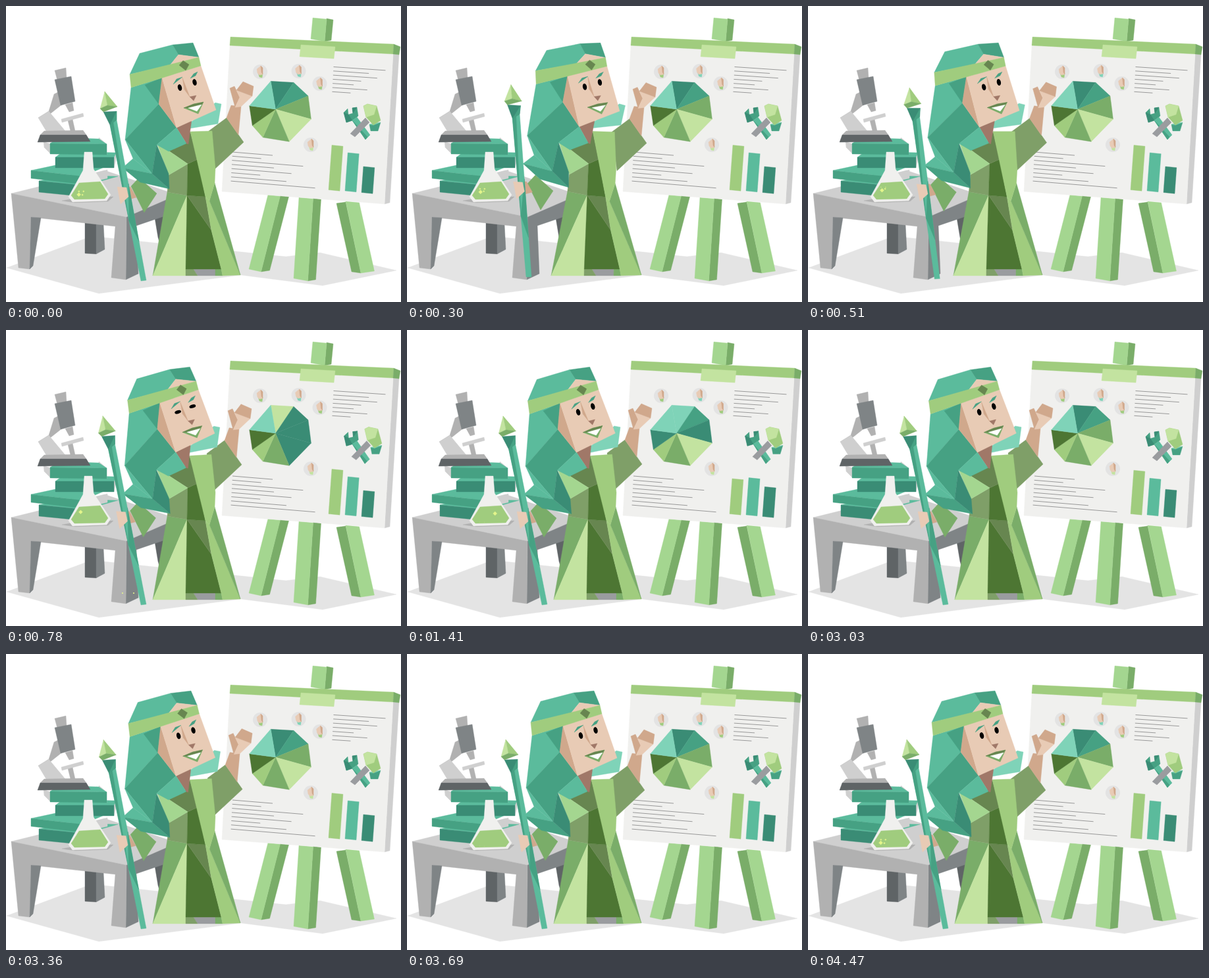
An HTML page for the animation above (4500 ms loop, 600 by 450 pixels).

```html
<!DOCTYPE html>
<html lang="en">
<head>
<meta charset="utf-8">
<title>Presentation</title>
<style>
html, body { margin: 0; width: 100%; height: 100%; overflow: hidden; background: #fff; }
svg { display: block; width: 100vw; height: 100vh; }
</style>
</head>
<body>
<svg id="stage" viewBox="0 0 600 450"></svg>
<script>
const LOOP = 4500;
const stage = document.getElementById('stage');
const C = {
  deep: '#3a8c75', teal: '#46a183', sea: '#5bbb9c', mint: '#7fd3b8',
  forest: '#4d7633', olive: '#678650', moss: '#7f9f68', leaf: '#7aad69',
  green: '#a0cc7e', fresh: '#a4d690', lime: '#c3e3a0',
  skin: '#e8cbb5', tan: '#d0a88c', brown: '#a07868',
  pale: '#e4e4e4', light: '#cfcfcf', gray: '#b1b1b1', steel: '#7f8486', dark: '#5f6466',
  mid: '#9a9c9f', paper: '#f0f0ee', white: '#fff', spark: '#e3f58b'
};

function el(parent, tag, attrs) {
  const e = document.createElementNS('http://www.w3.org/2000/svg', tag);
  for (const k in attrs) e.setAttribute(k, attrs[k]);
  parent.appendChild(e);
  return e;
}
const group = (parent = stage) => el(parent, 'g', {});
const place = (node, value) => node.setAttribute('transform', value);
const show = (node, on) => node.setAttribute('visibility', on ? 'visible' : 'hidden');
const paint = (node, color) => {
  node.setAttribute('fill', C[color]);
  node.setAttribute('stroke', C[color]);
};
function poly(parent, color, points) {
  const p = el(parent, 'polygon', { points, 'stroke-width': 0.4 });
  paint(p, color);
  return p;
}

// Faces over shared corners: 'a10,20 b...' and 'color:abc ...'; returns a redraw function
function mesh(parent, corners, faces) {
  const at = {};
  for (const c of corners.split(' ')) at[c[0]] = c.slice(1).split(',').map(Number);
  const list = faces.split(' ').map(f => {
    const [color, keys] = f.split(':');
    return { node: poly(parent, color, ''), keys: [...keys] };
  });
  const update = (move = p => p) => list.forEach(f =>
    f.node.setAttribute('points', f.keys.map(k => move(at[k]).join()).join(' ')));
  update();
  return update;
}

// Slanted post with a side face; negative side puts it on the left
function post(x, y, bx, by, w, side) {
  const drop = side < 0 ? -3 : 4, edge = side < 0 ? 0 : w, low = by + (side < 0 ? 0 : drop);
  poly(easel, 'leaf', `${x + edge},${y + 1} ${x + edge + side},${y + 3} ${bx + edge + side},${low - 2} ${bx + edge},${low}`);
  poly(easel, 'fresh', `${x},${y} ${x + w},${y + 2} ${bx + w},${by + drop} ${bx},${by}`);
}

// Book: front face, then the top reaching back by two offsets
function book(x, y, w, drop, h, color, back, far) {
  const rx = x + w, ry = y + drop;
  poly(room, 'light', `${rx},${ry} ${rx + far},${ry - 10} ${rx + far},${ry + 3} ${rx},${ry + h}`);
  poly(room, 'sea', `${x},${y} ${x + back},${y - 9} ${rx + far},${y - 7} ${rx},${ry}`);
  poly(room, color, `${x},${y} ${rx},${ry} ${rx},${ry + h} ${x},${y + h}`);
}

const room = group();
poly(room, 'pale', '1,398 130,350 425,381 477,375 593,402 481,425 357,409 141,437');
mesh(room, 'a8,285 b150,250 c245,282 d245,294 e183,321 f182,416 g160,413 h166,335 i38,321 j36,400 k19,398 l245,318 m198,334 n201,407 o53,322 p41,395 q120,329 r137,331 s137,377 t120,376 u148,332 v150,370 w226,322 x239,316 y237,372 z231,352',
  'dark:qrst steel:ruvs dark:wxyz light:abcde steel:edlmnf gray:aefghijk steel:iopj');

book(50, 266, 70, 7, 17, 'deep', 40, 50);
book(38, 250, 78, 9, 12, 'teal', 42, 38);
book(75, 230, 89, 0, 16, 'deep', 12, 3);
poly(room, 'light', '57,206 68,210 68,225 58,215');
book(67, 209, 86, 1, 16, 'teal', 13, -12);

// Microscope
mesh(room, 'a73,134 b81,130 c86,149 d67,164 e49,170 f65,160 g90,190 h61,190 i94,174 j101,172 k105,190 l98,190 m58,190 n117,189 o122,196 p52,196 q128,206 r48,207',
  'gray:abcdef light:efgh gray:ijkl gray:mnop dark:poqr');
mesh(room, 'a90,150 b101,147 c103,159 d96,161 e74,98 f91,94 g92,110 h78,113 i74,112 j99,107 k105,145 l83,151 m84,172 n117,163 o118,168 p85,177',
  'gray:abcd gray:efgh steel:ijkl light:mnop');

// Flask
poly(room, 'gray', '85,296 120,290 163,290 155,297 105,299');
poly(room, 'paper', '119,222 131,222 133,248 159,287 153,296 101,298 95,290 117,250');
poly(room, 'green', '111,269 143,267 155,286 150,293 104,294 99,288');

// Rising bubbles
const sparks = [];
function bubble(x, dx, at, life, r = 1.3, y = 292.5) {
  const node = poly(room, 'spark', `0,${-r} ${r},0 0,${r} ${-r},0`);
  sparks.push({ node, x, dx, at, life, y });
}
for (const at of [1380, 3660])
  for (const x of [110.5, 117.5]) bubble(x, 0.5, at, 1420);
bubble(109, 5, 4050, 1400, 3);
bubble(115.5, 2, 4200, 1000);
bubble(133, 2, 1140, 800, 3, 285);
const drops = group();
for (const cx of [177, 194]) el(drops, 'circle', { cx, cy: 400, r: 1.1, fill: C.spark });

// Easel and board
const easel = group();
post(466, 18, 463, 50, 21, 10);
post(398, 287, 369, 400, 18.5, 13);
post(445, 291, 437, 414, 21.5, 12);
post(516, 297, 539, 406, 20.5, -14);
mesh(easel, 'a341,47 b589,58 c599,62 d597,74 e588,73 f340,60 g583,299 h575,301 i328,282 j448,59 k500,62 l498,80 m446,77',
  'light:edgh paper:fehi green:abef leaf:bcde lime:jklm');

function badge(x, y, tip) {
  const g = el(easel, 'g', { transform: `translate(${x} ${y})` });
  el(g, 'circle', { r: 11, fill: '#e3e3e3' });
  poly(g, tip, '-3,2 4,2 3,9 -1,8');
  poly(g, 'skin', '-5,-4 1,-9 4,-6 4,4 -1,5 -4,2');
  poly(g, 'tan', '1,-9 4,-6 4,4 2,1');
}
badge(386, 100, 'green');
badge(444.5, 99, 'mint');
badge(476.5, 118, 'green');
badge(463, 211, 'lime');

function lines(x, y, slope, widths) {
  widths.forEach((w, i) => {
    const x1 = x - i * 0.35, y1 = y + i * 6.3;
    el(easel, 'line', { x1, y1, x2: x1 + w, y2: y1 + w * slope, stroke: '#999', 'stroke-width': 1 });
  });
}
lines(497.5, 92.5, 0.068, [79, 54, 67, 43, 32, 53, 28]);
lines(344, 222, 0.083, [61, 44, 108, 64, 91, 44, 84, 128]);

// Pie: rim angles on a circle, slices meet off centre
const rim = [-108, -65.5, -29, 14.5, 74, 124, 153, 190].map(d => {
  const a = d * Math.PI / 180;
  return `${417 + 48 * Math.cos(a)},${160 + 48 * Math.sin(a)}`;
});
const pie = ['deep', 'teal', 'leaf', 'lime', 'leaf', 'green', 'forest', 'mint'].map((color, i) =>
  ({ color, node: poly(easel, color, `409.5,157 ${rim[i]} ${rim[(i + 1) % 8]}`) }));
const flashes = [
  { slice: 0, from: 540, to: 990, color: 'lime' },
  { slice: 0, from: 990, to: 1890, color: 'mint' },
  { slice: 1, from: 600, to: 1170, color: 'deep' },
  { slice: 2, from: 660, to: 1740, color: 'deep' },
  { slice: 3, from: 720, to: 1290, color: 'deep' },
  { slice: 6, from: 1380, to: 1950, color: 'deep' }
];

// Bars: each swings twice and all settle together
const bars = [
  { x: 490, y: 279.5, top: 211.5, color: 'green', at: 1080, amp: 20 },
  { x: 515, y: 281, top: 223, color: 'sea', at: 1330, amp: 20 },
  { x: 540, y: 283.5, top: 244, color: 'deep', at: 1230, amp: -18 }
];
for (const b of bars) b.node = poly(easel, b.color, '');

const wrench = group(easel);
mesh(wrench, 'a513,162 b519,156 c520,165 d527,163 e526,155 f533,154 g535,167 h528,177 i517,177 j526,174 k533,169 l553,196 m546,203 n537,173 o549,199',
  'teal:abcdefgkji deep:acji deep:efd sea:jklm teal:jom');
const hammer = group(easel);
mesh(hammer, 'a523,194 b546,170 c552,177 d530,199 e552,180 f569,177 g565,190 h554,190 i543,152 j549,149 k563,152 l569,174 m558,181 n547,169 o559,165',
  'mid:abcd teal:efgh mint:efm green:ijklmn lime:ijkon');

// Figure
const arm = group();
mesh(arm, 'a308,190 b335,170 c361,207 d316,249 e342,151 f357,153 g353,196 h340,125 i347,122 j355,139 k348,154 l350,128 m360,115 n376,122 o374,137',
  'moss:abcd tan:befg tan:hijk skin:lofkj tan:lmno');

const dress = mesh(group(),
  'a245,283 b275,288 c223,410 d273,410 e273,400 f327,400 g329,410 h356,409 i303,290 j312,341 k309,296 l317,269 m247,257 n276,240 o291,233 p229,208 q247,220 r274,206 s280,191 t313,190 u318,247 v284,399 w318,400 x318,410 y291,410',
  'leaf:abc lime:bdc mid:vwxy moss:evyd leaf:wfgx forest:befj olive:bij green:ikhgfj leaf:lkh moss:mnba forest:noib olive:qrson fresh:pqnm green:stulki');

const sleeve = group();
poly(sleeve, 'leaf', '190,274 202,261 229,285 210,314');

const head = group();
mesh(head, 'a188,104 b203,72 c253,59 d284,56 e293,78 f262,74 g190,124 h296,91 i237,109 j232,149 k259,185 l319,158 m181,203 n222,255 o229,211 p274,209 q247,221 r193,232 s177,246 t204,268 u248,278 v247,255 w211,120 x249,90 A279,178 B318,147 C327,149 D322,179 E280,186 F282,173 G277,210',
  'mint:ABCDE brown:kFGp sea:gijm teal:wij teal:mjkon sea:mrn sea:srn teal:snut deep:onuv sea:okpq tan:ijk skin:ihlk sea:abcfx teal:cdef skin:fex green:aehg');
mesh(head, 'a263,90 b269,83 c278,89 d273,98 e254,119 f259,111 g268,108 h280,110 i285,103 j291,100 k288,106 l268,109 m271,127 n279,138 o289,136 p285,144 q270,155 r285,149 s300,146 t292,164 u277,155 v297,150 w290,160',
  'olive:abcd teal:efg teal:hijk tan:lmn brown:nop leaf:qrst olive:qrsvu white:uvw');
const eyes = [[264, 124], [286.5, 116]].map(([cx, cy]) =>
  el(head, 'ellipse', { cx, cy, transform: `rotate(-14 ${cx} ${cy})` }));

const palm = group(), staff = group(), fingers = group();
poly(palm, 'tan', '183,275 189,275 198,291 183,295');
mesh(staff, 'a150,130 b143,156 c154,151 d169,153 e148,161 f168,160 h158,181 k168,173 l213,417 m205,418 n187,327 o163,177 p186,270 q202,358',
  'sea:hklm teal:hon teal:npq deep:efkh teal:fkh lime:abc green:acd leaf:bcde');
poly(fingers, 'skin', '169,275 183,276 186,290 174,301');

const clamp = u => Math.min(1, Math.max(0, u));
const ease = u => (u = clamp(u), u * u * (3 - 2 * u));
const span = (t, a, b) => ease((t - a) / (b - a));

// Lean right, then left, hold, return
const lean = t => 3.2 * span(t, 0, 300) - 5.3 * span(t, 300, 900) + 2.1 * span(t, 3060, 3640);

function render(t) {
  const deg = lean(t), a = deg * Math.PI / 180;
  const right = Math.max(0, deg) / 3.2, left = Math.max(0, -deg) / 2.1;

  // The skirt follows only the right lean
  dress(([x, y]) => {
    const k = y < 232 ? 1 : x > 340 || deg < 0 ? 0 : 0.4;
    return [x + a * k * (231 - y), y + (y < 300 ? a * k * (x - 288) : 0)];
  });
  place(head, `rotate(${deg} 288 231)`);
  place(arm, `translate(${3 * right - 4 * left} ${1.5 * right - 3 * left})`);
  place(sleeve, `translate(${-7 * right - 2 * left} ${-4 * right + left})`);
  for (const g of [palm, fingers])
    place(g, `translate(${-7.5 * right - 2 * left} ${-8 * right + left})`);
  place(staff, `translate(0 ${-7 * right}) rotate(${6.3 * right} 185 200) rotate(${-0.8 * left} 209 417)`);

  const shut = span(t, 660, 750) - span(t, 810, 900);
  for (const e of eyes) {
    e.setAttribute('rx', 3.1 + 1.9 * shut);
    e.setAttribute('ry', 5 - 2.4 * shut);
  }

  for (const s of pie) paint(s.node, s.color);
  for (const f of flashes)
    if (t >= f.from && t < f.to) paint(pie[f.slice].node, f.color);

  for (const b of bars) {
    const u = clamp((t - b.at) / (3130 - b.at));
    const top = b.top + b.amp * Math.sin(2 * Math.PI * u) ** 2;
    const x = b.x + (b.y - top) * 0.073;
    b.node.setAttribute('points', `${x},${top} ${x + 17},${top + 1.7} ${b.x + 17},${b.y + 1.7} ${b.x},${b.y}`);
  }

  const work = Math.sin(clamp((t - 570) / 1050) * Math.PI * 3);
  place(wrench, `rotate(${2 * work} 540 177)`);
  place(hammer, `translate(${2 * work} ${-1.5 * work})`);

  for (const s of sparks) {
    const u = ((t - s.at + LOOP) % LOOP) / s.life;
    show(s.node, u < 1);
    if (u < 1) place(s.node, `translate(${s.x + s.dx * u} ${s.y - 18 * u}) scale(${clamp(Math.min(u * 10, (1 - u) * 10))})`);
  }
  show(drops, t >= 700 && t < 860);
}

const start = performance.now();
function tick(now) {
  render(Math.max(0, now - start) % LOOP);
  requestAnimationFrame(tick);
}
render(0);
requestAnimationFrame(tick);
</script>
</body>
</html>
```
